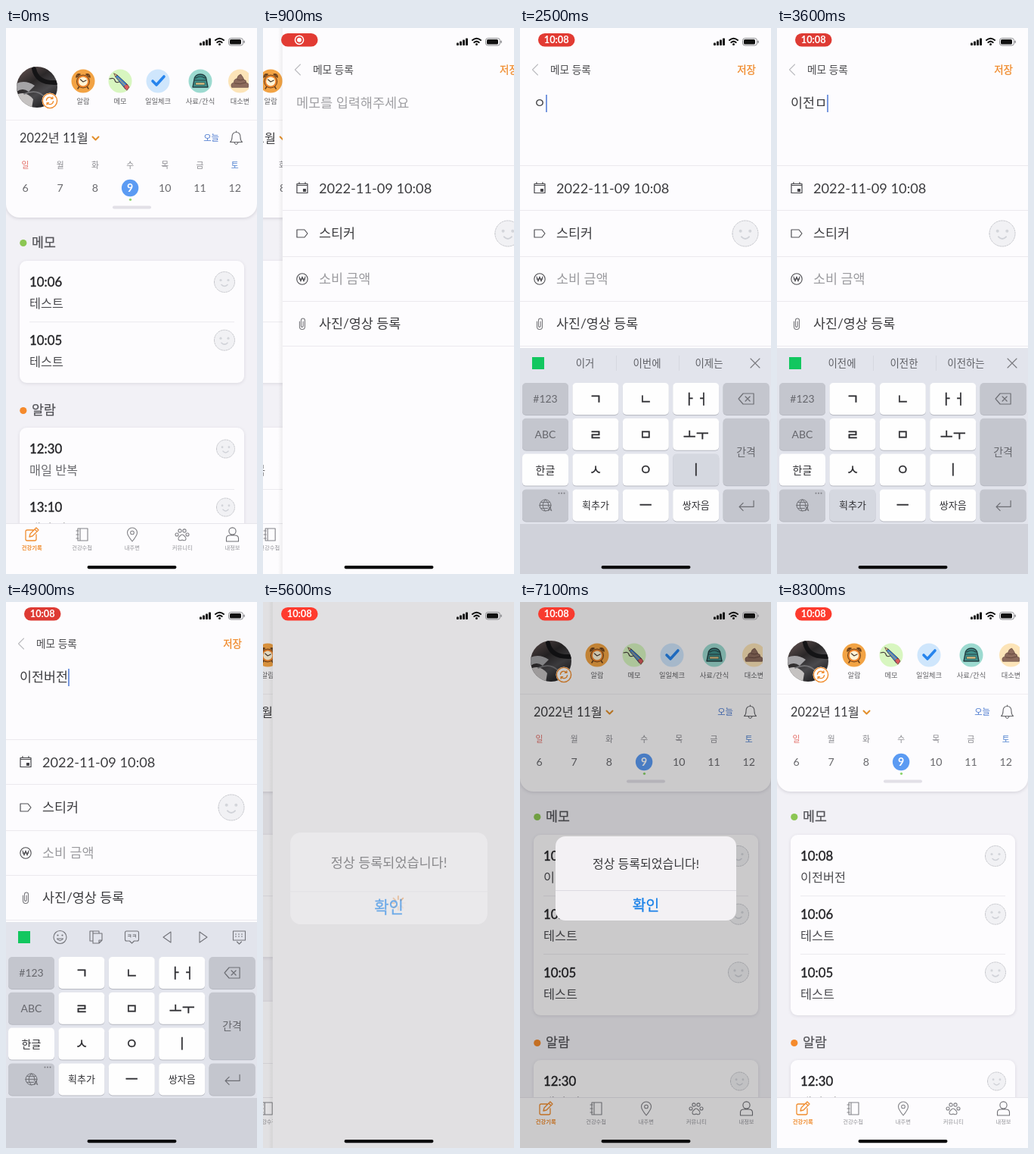
Animation, 332 px wide and 720 px high, one loop 8400 ms. Source, as an HTML page with a canvas:

```html
<!DOCTYPE html>
<html lang="ko">
<head>
<meta charset="utf-8">
<title>메모 등록</title>
<style>
  html, body { margin: 0; width: 100%; height: 100%; overflow: hidden; background: #fdfcfe; }
  canvas { display: block; width: 100vw; height: 100vh; }
</style>
</head>
<body>
<canvas id="stage"></canvas>
<script>
const W = 332, H = 720, LOOP = 8400, STEP = 100;
const canvas = document.getElementById('stage');
const c = canvas.getContext('2d');
const dpr = window.devicePixelRatio || 1;
canvas.width = W * dpr;
canvas.height = H * dpr;

const FONT = 'Lato, "Noto Sans CJK KR", "Noto Sans CJK", sans-serif';
const PAPER = '#fdfcfe', ORANGE = '#f08c2e', INK = '#3c3c3f', LINE = '#ebe9ee';

const clamp = v => Math.max(0, Math.min(1, v));
const easeOut = v => 1 - (1 - clamp(v)) ** 2;
// Critically damped spring, time in ms
const spring = ms => {
  const k = Math.max(0, ms) * 0.014;
  return k > 9 ? 1 : 1 - (1 + k) * Math.exp(-k);
};

// ---- drawing helpers ----
function text(s, x, cy, size, color, align = 'left', weight = 400, extra = 0) {
  c.font = `${weight} ${size}px ${FONT}`;
  c.textAlign = align;
  c.fillStyle = color;
  c.fillText(s, x, cy + size * 0.365);
  if (extra) {
    c.strokeStyle = color;
    c.lineWidth = extra;
    c.strokeText(s, x, cy + size * 0.365);
  }
}
function rect(x, y, w, h, color) {
  c.fillStyle = color;
  c.fillRect(x, y, w, h);
}
function round(x, y, w, h, r, color) {
  c.fillStyle = color;
  c.beginPath();
  c.roundRect(x, y, w, h, r);
  c.fill();
}
function disc(x, y, r, color) {
  c.fillStyle = color;
  c.beginPath();
  c.arc(x, y, r, 0, 7);
  c.fill();
}
function path(d, x, y, stroke, width = 1, fill) {
  const p = new Path2D(d);
  c.save();
  c.translate(x, y);
  c.lineCap = c.lineJoin = 'round';
  if (fill) { c.fillStyle = fill; c.fill(p); }
  if (stroke) { c.strokeStyle = stroke; c.lineWidth = width; c.stroke(p); }
  c.restore();
}
function shadow(color, blur, dy) {
  c.shadowColor = color;
  c.shadowBlur = blur * dpr;
  c.shadowOffsetY = dy * dpr;
}
function at(x, y, draw) {
  c.save();
  c.translate(x, y);
  draw();
  c.restore();
}
const ring = (r, x = 0, y = 0) => `M${x - r} ${y}a${r} ${r} 0 1 0 ${2 * r} 0a${r} ${r} 0 1 0 ${-2 * r} 0`;

function smiley(x, y, r) {
  disc(x, y, r, '#f1f1f4');
  c.save();
  c.setLineDash([2, 1.3]);
  path(ring(r), x, y, '#c3c4ca', 0.9);
  c.restore();
  const k = r / 13.5;
  disc(x - 5 * k, y - 2.5 * k, 1.6 * k, '#d3d5da');
  disc(x + 5 * k, y - 2.5 * k, 1.6 * k, '#d3d5da');
  path(`M${-4 * k} ${3.5 * k}Q0 ${7.5 * k} ${4 * k} ${3.5 * k}`, x, y, '#d0d2d8', 1.6 * k);
}

// ---- home screen ----
function avatar() {
  c.save();
  c.beginPath();
  c.arc(41, 78, 27, 0, 7);
  c.clip();
  const g = c.createLinearGradient(20, 55, 52, 106);
  g.addColorStop(0, '#5b4d4c');
  g.addColorStop(0.35, '#2b2829');
  g.addColorStop(0.65, '#4a494c');
  g.addColorStop(1, '#19191b');
  rect(14, 50, 54, 56, g);
  path('M14 73Q26 68 38 76L30 84Q22 78 14 84Z', 0, 0, null, 0, '#a4a3a6');
  path('M14 88Q26 82 36 94L34 106H14Z', 0, 0, null, 0, '#c5c2c1');
  path('M37 54Q41 73 66 72', 0, 0, '#141416', 6);
  path('M24 87Q40 80 50 90', 0, 0, '#767578', 1.5);
  c.restore();
  disc(58, 96, 10.5, '#fff');
  path(ring(9.6), 58, 96, ORANGE, 1.4);
  path('M-4.6 -.6A4.7 4.7 0 0 1 3.8 -2.8M3.9 -5.2V-2.6H1.3M4.6 .6A4.7 4.7 0 0 1 -3.8 2.8M-3.9 5.2V2.6H-1.3', 58, 96, ORANGE, 1.3);
}

function menu() {
  const items = [['알람', 102, '#f2a344'], ['메모', 151, '#d8f6c0'], ['일일체크', 201, '#cfe6fc'],
                 ['사료/간식', 257, '#9cdad0'], ['대소변', 309.5, '#fce4b8']];
  c.save();
  c.beginPath();
  c.rect(80, 40, 241, 75);
  c.clip();
  for (const [name, x, color] of items) {
    disc(x, 70, 15.5, color);
    text(name, x, 97, 9.3, '#626265', 'center');
  }
  at(102, 70, () => {
    path('M-9 -5Q-9 -10 -4 -9ZM9 -5Q9 -10 4 -9ZM-5 7L-7 10M5 7L7 10', 0, 0, '#68401d', 1.6, '#ef7f24');
    disc(0, 0.5, 9, '#68401d');
    disc(0, 0.5, 8, '#ee8429');
    disc(0, 0.5, 6, '#fff3d5');
    path('M-3.5 -2L0 1L4 -1', 0, 0, '#493a31', 1.2);
  });
  at(151, 70, () => {
    path('M-14 -3Q-8 -5 -7 -1T-1 1', 0, 0, '#4b4440', 1.2);
    path('M-6 -6L-4 -8L10 5L7 10Z', 0, 0, '#344062', 1, '#4385ce');
    path('M5 7L9 4L12 8L9 12Z', 0, 0, '#70333a', 0.8, '#dc5a5d');
    path('M-6 -6L-4 -8L-8 -10Z', 0, 0, '#584233', 0.8, '#f1c494');
    path('M-3 -4L7 6', 0, 0, '#d9a447', 1);
  });
  path('M-7 0L-2 5L8 -6', 201, 70, '#2684ed', 3.6);
  at(257, 70, () => {
    path('M-10 8L-8 -2Q-7 -9 0 -9T8 -2L10 8Z', 0, 0, '#243f42', 1.4, '#40918b');
    path('M-7 -1H7M-6 -4Q0 -8 6 -4', 0, 0, '#243f42', 1.2);
    path('M-6 2H6V5H-6Z', 0, 0, '#2c5554', 0.8, '#e6c582');
  });
  path('M-11 8Q-13 3 -8 2Q-8 -3 -4 -3Q-3 -8 1 -9Q5 -4 5 -2Q9 -1 8 2Q13 3 11 8Z', 309.5, 70, '#6e5148', 0.8, '#8d6b5c');
  path('M-7 3Q0 5 8 2M-4 -2Q1 0 5 -2', 309.5, 70, '#65483e', 1);
  c.restore();
}

function calendar() {
  text('2022년 11월', 18, 145, 16.3, INK);
  path('M-4 -2L0 2L4 -2', 118.5, 145.5, '#e28f2c', 2);
  text('오늘', 282, 145, 11.3, '#4b79cf', 'right');
  path('M-8 5.5Q-5.5 3.5 -5.5 -1Q-5.5 -7.5 0 -7.5T5.5 -1Q5.5 3.5 8 5.5ZM0 -9V-7.5M-2.5 6Q0 11 2.5 6', 304.5, 145, '#66666a', 1.1);
  [...'일월화수목금토'].forEach((day, i) => {
    const x = 25.5 + i * 46.2;
    text(day, x, 181.5, 10.8, i === 0 ? '#e36f68' : i === 6 ? '#4d80cf' : '#8b8b90', 'center');
    if (i === 3) disc(x, 211, 11.2, '#5b9bf3');
    text(String(6 + i), x, 210.5, 14.2, i === 3 ? '#fff' : '#69696d', 'center', i === 3 ? 700 : 400);
  });
  disc(164.5, 226.3, 1.6, '#8bd46a');
  round(141, 234.5, 51, 4, 2, '#e2e0e7');
}

function heading(name, y, color) {
  disc(22.8, y + 0.5, 4.6, color);
  text(name, 34, y, 17.3, '#55555a', 'left', 500, 0.25);
}
function card(y, h) {
  c.save();
  shadow('rgba(60,55,80,.13)', 4, 1);
  round(18, y, 297, h, 9, PAPER);
  c.restore();
}
function entry(time, body, y, r, color) {
  text(time, 31, y, 16.8, '#252528', 'left', 400, 0.4);
  text(body, 31, y + 28.5, 16.3, color);
  smiley(r < 13 ? 290.5 : 289, y, r);
}

function tabs() {
  rect(0, 653, W, 67, PAPER);
  rect(0, 653, W, 1, '#e7e5eb');
  ['건강기록', '건강수첩', '내주변', '커뮤니티', '내정보'].forEach((name, i) => {
    text(name, 34.3 + i * 66.3, 685.5, 7.3, i ? '#929297' : ORANGE, 'center', i ? 400 : 700);
  });
  const gray = '#828287';
  path('M2 -6H-6Q-8 -6 -8 -4V6Q-8 8 -6 8H4Q6 8 6 6V0M-3 3L-2 -1L6 -9L9 -6L1 2ZM4 -7L7 -4', 34, 668, ORANGE, 1.3);
  path('M-6 -8H7V8H-6ZM-3 -8V8M-8 -5H-5M-8 0H-5M-8 5H-5', 101, 668, gray, 1.1);
  path('M0 9Q-6.5 1 -6.5 -2.5A6.5 6.5 0 0 1 6.5 -2.5Q6.5 1 0 9Z' + ring(2.3, 0, -2.5), 167, 668, gray, 1.1);
  path('M-5 6Q-5 3 -2 1Q0 -1 2 1Q5 3 5 6Q4 9 0 7Q-4 9 -5 6Z' + ring(2, -7, 0) + ring(2.1, -3, -5) + ring(2.1, 3, -5) + ring(2, 7, 0), 233, 668, gray, 1.1);
  path(ring(4.6, 0, -4.5) + 'M-8 9V5Q-8 1 -3 1H3Q8 1 8 5V9Z', 299.5, 668, '#707075', 1.1);
}

function home(entries) {
  rect(0, 0, W, H, '#f2f1f6');
  heading('메모', 283, '#8cc653');
  const h = entries.length * 77 + 7;
  card(307, h);
  entries.forEach(([time, body], i) => {
    const y = 335 + i * 76.7;
    if (i) rect(31, y - 24.5, 271, 1, LINE);
    entry(time, body, y, 13.5, '#4c4c50');
  });
  const top = 307 + h;
  heading('알람', top + 36, '#f58a2c');
  card(top + 59, 180);
  entry('12:30', '매일 반복', top + 87, 12, '#6b6b6f');
  rect(31, top + 140, 271, 1, LINE);
  entry('13:10', '매일 반복', top + 164, 12, '#6b6b6f');

  c.save();
  shadow('rgba(60,55,80,.18)', 4, 1);
  round(0, -20, W, 270, 18, PAPER);
  c.restore();
  rect(0, 121, W, 1, '#efedf1');
  avatar();
  menu();
  calendar();
  tabs();
}

// ---- keyboard and typing ----
const KEYS = [
  ['#123', 0, 0], ['ㄱ', 1, 0], ['ㄴ', 2, 0], ['ㅏㅓ', 3, 0], ['del', 4, 0],
  ['ABC', 0, 1], ['ㄹ', 1, 1], ['ㅁ', 2, 1], ['ㅗㅜ', 3, 1], ['간격', 4, 1],
  ['한글', 0, 2], ['ㅅ', 1, 2], ['ㅇ', 2, 2], ['ㅣ', 3, 2],
  ['globe', 0, 3], ['획추가', 1, 3], ['ㅡ', 2, 3], ['쌍자음', 3, 3], ['enter', 4, 3]
];
const DARK = ['#123', 'ABC', 'del', '간격', 'globe', 'enter'];
const STROKES = [
  ['ㅇ', 'ㅇ'], ['ㅣ', '이'], ['ㅅ', '잇'], ['획추가', '잊'], ['ㅏㅓ', '이자'], ['ㅏㅓ', '이저'],
  ['ㄴ', '이전'], ['ㅁ', '이전ㅁ'], ['획추가', '이전ㅂ'], ['ㅏㅓ', '이전바'], ['ㅏㅓ', '이전버'],
  ['ㅅ', '이전벗'], ['획추가', '이전벚'], ['ㅏㅓ', '이전버자'], ['ㅏㅓ', '이전버저'], ['ㄴ', '이전버전']
];
const TYPE_AT = 2400, GAP = 155;

function typing(t) {
  const n = Math.max(0, Math.min(STROKES.length, Math.floor((t - TYPE_AT) / GAP) + 1));
  const next = TYPE_AT + n * GAP;
  return {
    value: n ? STROKES[n - 1][1] : '',
    pressed: n < STROKES.length && next - t < 80 ? STROKES[n][0] : '',
    busy: n > 0 && n < STROKES.length,
    since: n ? next - GAP : 1684
  };
}

function toolbar({ value, busy }) {
  rect(16, 434, 16, 16, '#12c75f');
  const gray = '#727379';
  if (busy) {
    const words = value.startsWith('이전') ? ['이전에', '이전한', '이전하는'] : ['이거', '이번에', '이제는'];
    words.forEach((word, i) => text(word, 86 + i * 82, 442, 13.4, '#5f6066', 'center'));
    rect(127, 432, 1, 20, '#d6d8e0');
    rect(210, 432, 1, 20, '#d6d8e0');
    path('M-6 -6L6 6M6 -6L-6 6', 311, 442, '#77787d', 1.1);
    return;
  }
  path(ring(8.5) + 'M-4 2Q0 7 4 2Z', 71.5, 442, gray, 1.1);
  disc(68.5, 439.5, 1.1, gray);
  disc(74.5, 439.5, 1.1, gray);
  path('M-4 -5V-8H-8V5H-4M-4 -5H8V4L4 8H-4ZM4 8V4H8M-4 -8H4V-5', 119, 442, gray, 1.1);
  path('M-7 -8H7Q9 -8 9 -6V3Q9 5 7 5H3L0 8L-3 5H-7Q-9 5 -9 3V-6Q-9 -8 -7 -8Z', 166.5, 442, gray, 1.1);
  text('ㅋㅋ', 166.5, 440.5, 7, gray, 'center', 700);
  path('M5 -7V7L-5 0Z', 213, 442, gray, 1.1);
  path('M-5 -7V7L5 0Z', 261, 442, gray, 1.1);
  path('M-8 -8H8V4H-8ZM-5 -4H-4M-1 -4H0M3 -4H4M-5 -1H-4M-1 -1H0M3 -1H4M-3 6L0 9L3 6', 308.5, 442, gray, 1.1);
}

function keyboard(state) {
  rect(0, 422, W, 300, '#d0d2da');
  rect(0, 422, W, 232, '#e2e4ec');
  toolbar(state);
  for (const [label, col, row] of KEYS) {
    const x = 3 + col * 66.4, y = 468 + row * 46.8;
    const h = label === '간격' ? 88.5 : 42;
    const mx = x + 30.5, my = y + h / 2;
    const fill = DARK.includes(label) ? '#c4c6ce' : state.pressed === label ? '#d5d8e0' : '#fefefe';
    round(x, y + 1, 61, h, 5, '#b7b9c2');
    round(x, y, 61, h, 5, fill);
    if (label === 'del') {
      path('M-10 0L-4 -7H10V7H-4ZM-1 -3L5 3M5 -3L-1 3', mx, my, '#6d6e74', 1.2);
    } else if (label === 'enter') {
      path('M10 -6V2H-9M-4 -3L-9 2L-4 7', mx, my, '#6d6e74', 1.2);
    } else if (label === 'globe') {
      path(ring(7.5) + 'M-7.5 0H7.5M-6 -4H6M-6 4H3M0 -7.5Q-7 0 0 7.5M0 -7.5Q6 -2 4 2', mx, my, '#6d6e74', 1);
      text('A', mx + 6, my + 5, 8, '#6d6e74', 'center', 700);
      for (let i = 0; i < 3; i++) disc(51.5 + i * 3.5, 613.5, 1, '#7b7c82');
    } else {
      const jamo = /^[ㄱ-ㅣ]+$/.test(label);
      const size = jamo ? 18.5 : label.length === 3 && row === 3 ? 13 : 14;
      text(label, mx, my, size, DARK.includes(label) ? '#66676d' : '#303034', 'center', 400, jamo ? 0.35 : 0);
    }
  }
}

// ---- memo form ----
function memo(t, blank) {
  rect(0, 0, W, H, PAPER);
  if (blank) {
    for (let i = 0; i < 8; i++) {
      const a = (i / 8 + Math.floor(t / 100) / 8) * Math.PI * 2, x = Math.cos(a), y = Math.sin(a);
      c.globalAlpha = (i + 1) / 8;
      path(`M${x * 5} ${y * 5}L${x * 9} ${y * 9}`, 166, 397, ORANGE, 2);
      c.globalAlpha = 1;
    }
    return;
  }
  path('M4 -7L-3 0L4 7', 19.5, 55, '#bcbcc1', 1.1);
  text('메모 등록', 40, 55, 13.7, '#4a4a4d');
  text('저장', 312, 55, 13.5, ORANGE, 'right', 500, 0.3);

  const state = typing(t);
  if (state.value) text(state.value, 18, 99, 17.4, INK);
  else text('메모를 입력해주세요', 18, 99, 17.5, '#a0a0a4');
  if (t >= 1684 && (t - state.since) % 1000 < 650) {
    c.font = `400 17.4px ${FONT}`;
    rect(state.value ? 18 + c.measureText(state.value).width : 17, 88, 2, 23, '#7898df');
  }

  for (const y of [181, 240, 301, 360, 419]) rect(0, y, W, 1, LINE);
  text('2022-11-09 10:08', 48, 211, 18.2, INK);
  text('스티커', 48, 271, 17.4, INK);
  text('소비 금액', 48, 330.5, 17.4, '#9b9b9f');
  text('사진/영상 등록', 48, 390, 17.4, INK);
  path('M-7 -5H7V7H-7ZM-7 -3H7M-4 -7V-5M4 -7V-5', 26, 210.5, '#444448', 1.2);
  rect(27, 212, 4, 4, '#444448');
  path('M-7 -5H3L7 0L3 5H-7Z', 26, 271, '#505054', 1.2);
  path(ring(7.2) + 'M-4 -3L-2 3L0 -3L2 3L4 -3M-4 0H4', 26, 331, '#4d4d51', 1.1);
  path('M-3.5 -3V4A3.5 3.5 0 0 0 3.5 4V-4.5A2.5 2.5 0 0 0 -1.5 -4.5V3A1.3 1.3 0 0 0 1.2 3V-3', 26, 390, '#77777b', 1.1);
  smiley(298, 271, 17);

  const rise = spring(t - 1684);
  if (rise > 0) at(0, 298 * (1 - rise), () => keyboard(state));
}

// ---- overlays ----
function alertBox(t) {
  const gone = clamp((t - 7500) / 250);
  const shown = easeOut((t - 5470) / 400);
  const alpha = shown * (1 - gone);
  if (alpha <= 0) return;
  rect(0, 0, W, H, `rgba(0,0,0,${0.2 * alpha})`);
  c.save();
  const scale = 1.2 - 0.2 * shown;
  c.translate(166.5, 364.5);
  c.scale(scale, scale);
  c.translate(-166.5, -364.5);
  c.globalAlpha = alpha;
  round(47, 309, 239, 111, 13, '#f3f1f4');
  rect(47, 380, 239, 0.8, '#d8d6dc');
  text('정상 등록되었습니다!', 166.5, 345, 16, '#39393c', 'center');
  text('확인', 166.5, 399.5, 19.3, '#1880e8', 'center', 500, 0.3);
  c.restore();
}

function statusBar(t) {
  for (let i = 0; i < 4; i++) round(256 + i * 4, 19.5 - i * 2, 3, 3.5 + i * 2, 0.8, '#111');
  path('M-5.5 -2Q0 -6.5 5.5 -2M-3.2 1Q0 -1.8 3.2 1', 282.5, 18, '#111', 2);
  disc(282.5, 21.5, 1.5, '#111');
  c.strokeStyle = '#8b8b8f';
  c.lineWidth = 1;
  c.beginPath();
  c.roundRect(294.5, 13.5, 19, 9.5, 3);
  c.stroke();
  round(296, 15, 15, 6.5, 1.6, '#111');
  round(314.5, 16.5, 1.4, 3.5, 0.7, '#8b8b8f');

  if (t >= 300) {
    const dark = (1 - Math.cos((t - 1700) / 1300 * Math.PI * 2)) / 2;
    round(24, 7, 48.5, 17.5, 8.75, `rgb(${255 - 33 * dark},59,${46 + 6 * dark})`);
    if (t < 2500) {
      path(ring(5.6), 48, 15.8, '#fff', 1.5);
      disc(48, 15.8, 3, '#fff');
    } else {
      text('10:08', 48.2, 15.8, 12.8, '#fff', 'center', 700);
    }
  }
  round(107.5, 709, 118, 4.2, 2.1, '#0b0b0c');
}

const OLD = [['10:06', '테스트'], ['10:05', '테스트']];
const NEW = [['10:08', '이전버전'], ...OLD];

function draw(t) {
  c.setTransform(dpr, 0, 0, dpr, 0, 0);
  rect(0, 0, W, H, PAPER);
  // Share of the stage covered by the memo form
  const cover = t < 5578 ? spring(t - 600) : 1 - spring(t - 5578);
  if (cover < 0.999) at(-99.6 * cover, 0, () => home(t < 6100 ? OLD : NEW));
  if (cover > 0.001) {
    at(W * (1 - cover), 0, () => {
      if (cover < 0.999) {
        const g = c.createLinearGradient(-6, 0, 0, 0);
        g.addColorStop(0, 'rgba(0,0,0,0)');
        g.addColorStop(1, 'rgba(0,0,0,.06)');
        rect(-6, 0, 6, H, g);
      }
      memo(t, t >= 5450);
    });
  }
  alertBox(t);
  statusBar(t);
}

const start = performance.now();
function tick() {
  const t = (performance.now() - start) % LOOP;
  draw(Math.floor(t / STEP) * STEP);
  requestAnimationFrame(tick);
}
tick();
</script>
</body>
</html>
```
